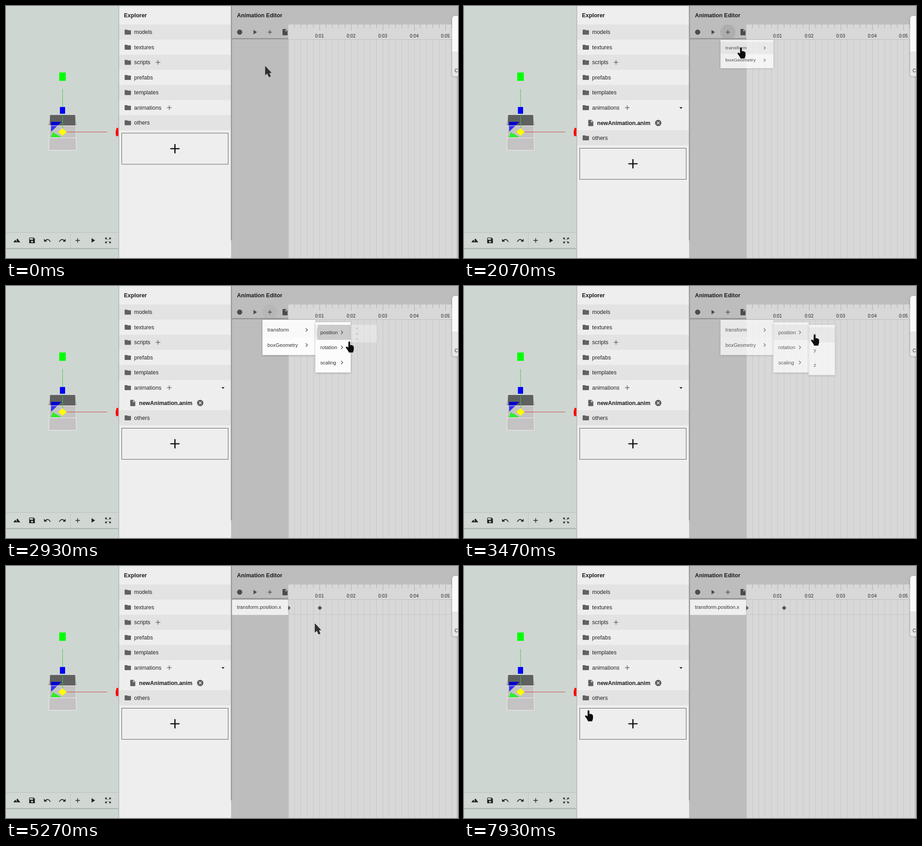
Write an HTML page that moves like this. It is 1002 px wide and 559 px high and loops after 8000 ms.

```html
<!DOCTYPE html>
<html lang="en">
<head>
<meta charset="utf-8">
<title>Animation editor</title>
<style>
  html, body { margin: 0; width: 100%; height: 100%; overflow: hidden; background: #ced6d1; }
  svg { display: block; width: 1002px; height: 559px; }
  text { font-family: "Liberation Sans", Arial, sans-serif; font-size: 12.5px; fill: #222; }
  .bold { font-weight: bold; fill: #1a1a1a; }
  .small { font-size: 11.25px; fill: #333; }
  .time { font-size: 10px; text-anchor: middle; fill: #222; }
  .menu { filter: drop-shadow(0 1px 2px rgba(0, 0, 0, .28)); }
</style>
</head>
<body>
<svg id="stage" viewBox="0 0 1002 559" xmlns="http://www.w3.org/2000/svg"></svg>
<script>
const LOOP = 8000, FRAME = 1000 / 15, ROW = 33.5;
const BEAT = 69.75, TICK = BEAT / 5, ORIGIN = 626;
const DARK = '#222', GREY = '#616161', TOOL = '#4c4c4c';

const rect = (x, y, w, h, fill, extra = '') =>
  `<rect x="${x}" y="${y}" width="${w}" height="${h}" fill="${fill}" ${extra}/>`;
const shape = (d, fill) => `<path d="${d}" fill="${fill}" fill-rule="evenodd"/>`;
const line = (d, stroke, width = 1) => `<path d="${d}" fill="none" stroke="${stroke}" stroke-width="${width}"/>`;
const text = (x, y, label, cls = '') => `<text x="${x}" y="${y}" class="${cls}">${label}</text>`;
const at = (x, y, body, extra = '') => `<g transform="translate(${x} ${y}) ${extra}">${body}</g>`;

// Icons are centred on 0,0.
const plus = (color, r = 4.9, width = 1.4) => line(`M${-r} 0H${r}M0 ${-r}V${r}`, color, width);
const play = color => shape('M-2.8-4.9V4.9L4.9 0Z', color);
const folder = shape('M-6-5.6H-1.4L0-4.2H6Q7-4.2 7-3V4.5Q7 5.6 6 5.6H-6Q-7 5.6-7 4.5V-4.5Q-7-5.6-6-5.6Z', GREY);
const file = color => shape('M-4.5-7H1.4L5.6-2.8V6Q5.6 7 4.5 7H-4.5Q-5.6 7-5.6 6V-6Q-5.6-7-4.5-7ZM.7-6V-2.1H4.6Z', color);
const chevron = line('M-2-3.7L1.7 0L-2 3.7', '#555', 1.4);
const dropDown = shape('M-3.5-1.4H3.5L0 2.1Z', '#111');
const cancel = `<circle r="7" fill="#5c5c5c"/>` + at(0, 0, plus('#eee', 4.2), 'rotate(45)');
const landscape = shape('M1.4-4.2L7.7 4.2H-7.7L-3.5-1.4L-.4 2.8L.7 2L-1.2-.7Z', DARK);
const floppy = shape('M-5-6.3H3.5L6.3-3.5V6.3H-6.3V-5ZM-4.9-4.9V-1.4H2.1V-4.9ZM0 .7A2.1 2.1 0 1 0 .1 .7Z', DARK);
const undo = line('M-4.6 1Q0-4 4.2-.6Q6 1 6.7 3.2', DARK, 1.8) + shape('M-7-3.5V2.8H-.7Z', DARK);
const expand = [0, 90, 180, 270].map(turn =>
  at(0, 0, shape('M2.1-6.3H6.3V-2.1Z', DARK) + line('M5-5L1.9-1.9', DARK, 1.4), `rotate(${turn})`)).join('');
const diamond = '<path d="M0-5L5 0 0 5-5 0Z" fill="#555"/>';

function viewport() {
  return rect(0, 0, 251, 559, '#ced6d1')
    + rect(118, 147.5, 14.5, 18.5, '#0f0') + rect(119.5, 224, 11.5, 15, '#00f')
    + shape('M97 241H154L156 265H95Z', '#5f6060') + rect(95, 265, 61, 55, '#c4c2c3')
    + shape('M100 257H123L100 279Z', '#3535ee') + shape('M100 257H123L114 265H100Z', '#0000cd')
    + shape('M104 280L123 291H99Z', '#2cee2c')
    + line('M97 241H154L156 320H95ZM95 265.5H156M95 292.5H156', '#f0f0f0')
    + line('M125.5 184V224M125.5 239V271', '#3ecb3e')
    + line('M134 279.5H224', '#c44')
    + shape('M125 271L134.5 279.5L125 288L116 279.5Z', '#ff0')
    + shape('M245 270.5H251V288.5H244L243 279.5Z', '#f00');
}

function bottomBar() {
  const tools = [landscape, floppy, undo, at(0, 0, undo, 'scale(-1 1)'), plus(DARK), play(DARK), expand];
  return rect(0, 502.5, 251, 35, '#d1d8d4')
    + line('M0 502.5H251M142.5 503V537', '#bac2bd')
    + rect(0, 537, 251, 1.5, '#a2a9a5') + rect(0, 538.5, 251, 1.5, '#c0c8c3')
    + tools.map((tool, i) => at(24 + i * 33.7, 520, tool)).join('')
    + rect(249, 0, 2, 559, '#b9c0bc');
}

function folderRow(name, index, plusX) {
  const top = 41 + index * ROW, mid = top + 17;
  return (index % 2 ? '' : rect(251, top, 247.5, ROW, '#e3e3e3'))
    + at(270, mid, folder) + text(284, mid + 4.2, name)
    + (plusX ? at(plusX, mid, plus('#666')) : '');
}

function explorer() {
  const plusX = { scripts: 337, animations: 362 };
  return rect(251, 0, 248, 559, '#eee') + text(261.5, 24.5, 'Explorer', 'bold')
    + ['models', 'textures', 'scripts', 'prefabs', 'templates', 'animations']
        .map((name, i) => folderRow(name, i, plusX[name])).join('')
    + `<g id="animFile">${at(481, 226, dropDown)}${at(281, 259.5, file(GREY))}
       ${text(295, 263.5, 'newAnimation.anim', 'bold')}${at(430.5, 259.5, cancel)}</g>`
    + `<g id="tail">${folderRow('others', 6)}
       ${rect(256.5, 282, 236, 69, 'none', 'stroke="#111" stroke-dasharray="2 1"')}
       ${at(374.5, 316.5, plus('#111', 10.2, 2.7))}</g>`;
}

function timeline() {
  let marks = '', lines = '', labels = '';
  for (let i = 1; ORIGIN + i * TICK < 999; i++) {
    const x = Math.floor(ORIGIN + i * TICK) + .5;
    marks += `M${x} 41V${i % 5 ? 49 : 54}`;
    lines += `M${x} 75V559`;
    if (i % 5 === 0) labels += text(x - .5, 69.5, `0:0${i / 5}`, 'time');
  }
  return rect(ORIGIN, 41, 376, 518, '#d8d8d8')
    + line(lines, '#c7c7c7') + line(marks, '#aaa') + line('M626 74.5H1000', '#bdbdbd') + labels
    + line('M626.5 75V559', '#d2bcd6') + rect(999, 41, 3, 518, '#c2c2c2');
}

function editor() {
  const tools = [`<circle r="5.8" fill="${TOOL}"/>`, play(TOOL), plus(TOOL), file(TOOL)];
  return rect(499, 0, 503, 559, '#bdbdbd') + rect(498.5, 0, 2.5, 520, '#989898')
    + text(512, 24.5, 'Animation Editor', 'bold')
    + '<circle id="hover" cx="585" cy="58" r="17"/>'
    + tools.map((tool, i) => at(518 + i * ROW, 58, tool)).join('')
    + rect(501, 71, 125, 3, '#989898') + timeline()
    + `<g id="track">${line('M626 107.5H999', '#c4c4c4')}${at(ORIGIN, 93, diamond)}
       ${rect(501, 75, 124.5, ROW, '#efefef')}${text(512, 95.3, 'transform.position.x', 'small')}</g>`
    + `<g id="keyframe">${diamond}</g>`
    + `<g class="menu">${rect(989, 22, 20, 134, '#fafafa', 'rx="6"')}</g>`
    + shape('M989 101H1002V156H995Q989 156 989 150Z', '#e6e6e6') + text(998, 146.5, 'C', 'time');
}

function menu(id, width, labels, nested) {
  const rows = labels.map((label, i) => {
    const mid = 22.4 + i * ROW;
    return text(11, mid + 3.9, label, 'small') + (nested ? at(width - 19.5, mid, chevron) : '');
  }).join('');
  return `<g id="${id}"><g class="menu">${rect(0, 0, width, labels.length * ROW + 11.2, '#fcfcfc')}</g>
    ${rect(0, 5.6, width, ROW, '#000', `id="${id}Hover" opacity=".055"`)}
    <g clip-path="url(#rowClip)"><circle id="${id}Ripple" cx="66" cy="25" r="0"/></g>${rows}</g>`;
}

const stage = document.getElementById('stage');
stage.innerHTML = `<clipPath id="rowClip">${rect(0, 5.6, 78.5, ROW, '#000')}</clipPath>`
  + viewport() + bottomBar() + explorer() + editor()
  + menu('parts', 117.5, ['transform', 'boxGeometry'], true)
  + menu('fields', 78.5, ['position', 'rotation', 'scaling'], true)
  + menu('axes', 58.5, ['x', 'y', 'z'], false)
  + `<path id="arrow" d="M0 0V19L4.4 15 8 23.3 11.4 21.8 7.9 14H13Z" fill="#303030" stroke="#111" stroke-width=".8"/>
     <path id="hand" d="M-1 2C-1-.7 3-.7 3 2V8Q11 8 11 13V17Q11 20 9 24.5H0Q-1 21-6.5 14C-7.5 12-5 10.5-3 12L-1 13.5Z" fill="#0c0c0c"/>`;

const el = id => document.getElementById(id);
const show = (id, on) => el(id).setAttribute('visibility', on ? 'visible' : 'hidden');
const move = (id, x, y) => el(id).setAttribute('transform', `translate(${x} ${y})`);
const clamp = v => Math.max(0, Math.min(1, v));
const ease = k => (1 - Math.cos(Math.PI * clamp(k))) / 2;

// Where the pointer arrives, and when; each trip takes at most TRIP ms.
const TRIP = 400;
const STOPS = [
  [0, 575, 134], [400, 624, 55], [1600, 587, 61], [2067, 613, 92], [2733, 752, 108], [2933, 760, 123],
  [3200, 781, 106], [3800, 709, 131], [4267, 697, 93], [5267, 685, 128], [5533, 692, 89],
  [6267, 683, 89], [6600, 703, 92], [6867, 736, 92], [7333, 706, 95], [7933, 275, 320]
];

function pointerAt(t) {
  let [last, x, y] = STOPS[0];
  for (const [end, toX, toY] of STOPS.slice(1)) {
    const start = Math.max(last, end - TRIP);
    const k = ease((t - start) / (end - start));
    x += (toX - x) * k;
    y += (toY - y) * k;
    last = end;
  }
  return [x, y];
}

const CLOSE = 3440;
function placeMenu(id, x, y, opened, t) {
  const grow = clamp((t - opened) / 200);
  const fade = 1 - clamp((t - CLOSE) / 100);
  show(id, grow * fade > 0);
  el(id).setAttribute('transform', `translate(${x} ${y}) scale(1 ${grow})`);
  el(id).setAttribute('opacity', grow * fade);
}

// While dragged, the keyframe snaps to the nearest tick.
function keyframeAt(t, pointerX) {
  const dragged = t > 6000 && t < 7400;
  const steps = dragged ? Math.round((pointerX - 697) / TICK) : Number(t > 7000);
  return ORIGIN + BEAT + steps * TICK;
}

function draw(t) {
  const [x, y] = pointerAt(t);
  const isHand = (t > 380 && t < CLOSE + 40) || t > 7840;
  show('hand', isHand);
  show('arrow', !isHand);
  move(isHand ? 'hand' : 'arrow', x, y);

  const hasFile = t > 790;
  show('animFile', hasFile);
  move('tail', 0, hasFile ? ROW : 0);
  el('hover').setAttribute('opacity', t < 1500 || t > CLOSE ? 0 : t < 2200 ? .08 : .03);

  placeMenu('parts', 568.5, 75, 1905, t);
  placeMenu('fields', 685.7, 80.3, 2180, t);
  placeMenu('axes', 764, 86, 2862, t);
  el('partsHover').setAttribute('opacity', t < 2300 ? .055 : .01);
  el('axesHover').setAttribute('opacity', t > 3050 ? .055 : 0);
  el('fieldsRipple').setAttribute('r', .75 * Math.max(0, t - 2850));
  el('fieldsRipple').setAttribute('opacity', .15 * (1 - clamp((t - 2980) / 220)));

  show('track', t > 3500);
  show('keyframe', t > 4920);
  move('keyframe', keyframeAt(t, x), 93);
}

function tick() {
  const t = performance.now() % LOOP;
  draw(Math.floor((t + 4) / FRAME) * FRAME % LOOP);
  requestAnimationFrame(tick);
}
tick();
</script>
</body>
</html>
```
